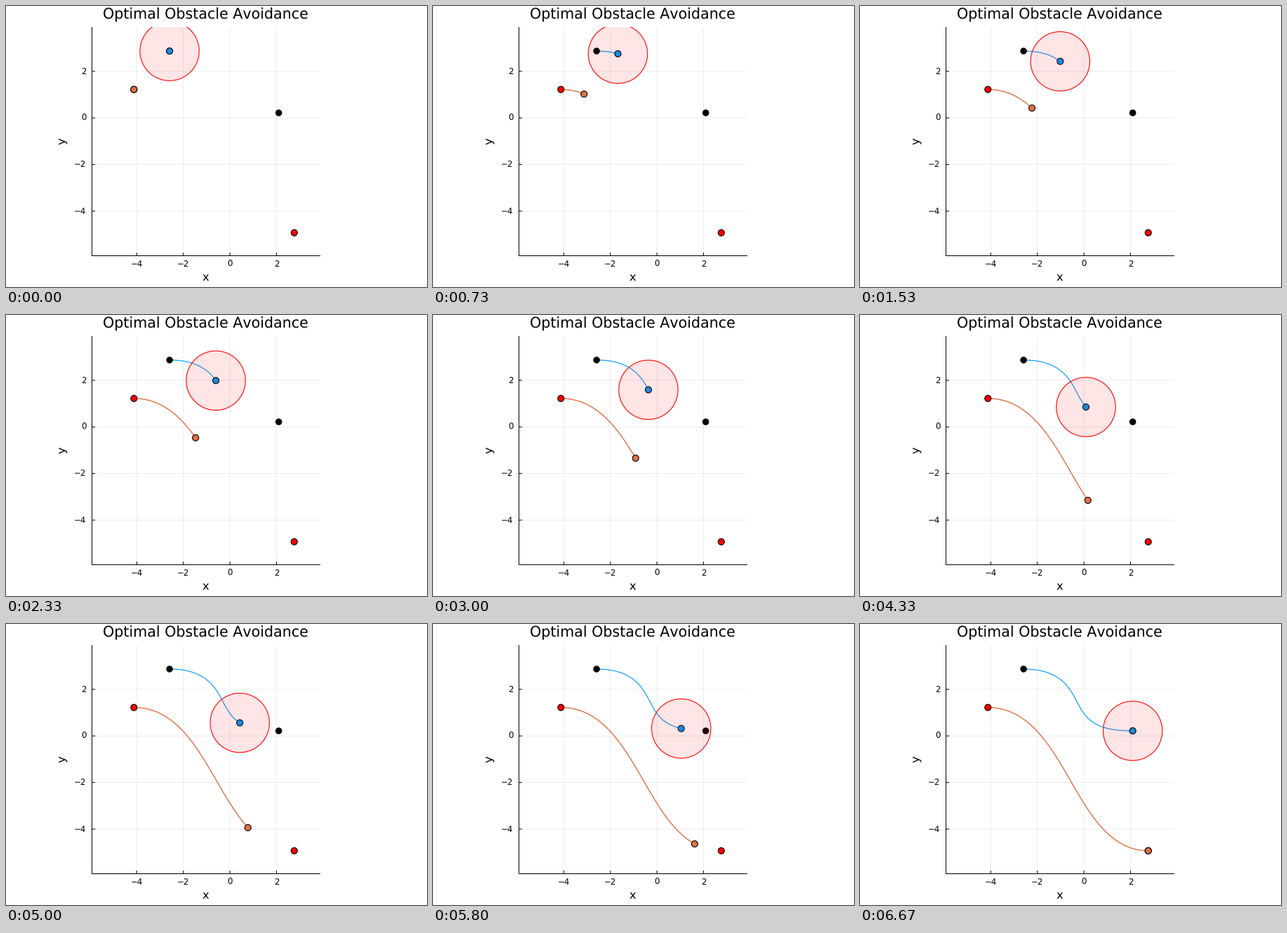
Animation, 600 px wide and 400 px high, one loop 6.74 s. Source, as a matplotlib script:

```python
import numpy as np
import matplotlib.pyplot as plt
from matplotlib.animation import FuncAnimation
from matplotlib.patches import Circle, Rectangle

plt.rcParams["text.kerning_factor"] = 6  # plain glyph advances, no pair kerning
plt.rcParams["text.hinting"] = "no_hinting"

W, H, DPI = 600, 400, 100
TICK, LOOP = 20, 6740
POSES, POSES_PER_MS = 101, 15 / 1000
PT = 72 / DPI  # points per pixel
LEFT, RIGHT, TOP, BOTTOM = 122.5, 447.5, 30.5, 355.5
UNIT, X0, Y0 = 33.17, 319.1, 159.3
BLUE, ORANGE = "#009af9", "#e26f46"


def glide(start, end, speed, push, skew):
    """Cubic with equal end speeds, bent aside midway by the avoidance push."""
    t = np.linspace(0, 1, POSES)
    cubic = start + (end - start) * t**2 * (3 - 2 * t)
    return cubic + speed * t * (1 - t) * (1 - 2 * t) \
        + t**2 * (1 - t)**2 * (push + skew * t)


blue_path = np.array([glide(233.1, 388.7, 331, -14, 14),
                      glide(64.1, 152.1, 0, 102, -48)])
orange_path = np.array([glide(182.3, 410.8, 326, 40, -45),
                        glide(118.8, 322.8, 0, -29, 0)])

fig = plt.figure(figsize=(W / DPI, H / DPI), dpi=DPI, facecolor="white")
ax = fig.add_axes([0, 0, 1, 1])
ax.set_xlim(0, W)
ax.set_ylim(H, 0)
ax.axis("off")


def line(xs, ys, color="black", width=1.0, **kw):
    return ax.plot(xs, ys, color=color, lw=width * PT, snap=False, **kw)[0]


def label(x, y, text, size, **kw):
    opts = dict(ha="center", va="baseline", family="DejaVu Sans", color="black")
    ax.text(x, y, text, fontsize=size * PT, **{**opts, **kw})


def dot(pos, color, z, radius=4.5):
    patch = Circle(pos, radius, fc=color, ec="black", lw=1.1 * PT, zorder=z)
    return ax.add_patch(patch)


for v in (-4, -2, 0, 2):
    x, y = X0 + UNIT * v, Y0 - UNIT * v
    text = str(v).replace("-", "\u2212")
    line([x, x], [TOP, BOTTOM], width=0.7, alpha=0.1, zorder=1)
    line([LEFT, RIGHT], [y, y], width=0.7, alpha=0.1, zorder=1)
    line([x, x], [BOTTOM, BOTTOM - 4], zorder=2)
    line([LEFT, LEFT + 4], [y, y], zorder=2)
    label(x, 371, text, 11.8)
    label(114.5, y + 3.8, text, 11.8, ha="right")
line([LEFT, LEFT], [TOP, BOTTOM], zorder=2)
line([LEFT, RIGHT], [BOTTOM, BOTTOM], zorder=2)

label(284.6, 18.2, "Optimal Obstacle Avoidance", 20.7)
label(284.4, 391.2, "x", 16.2)
label(88.6, 192.4, "y", 16.2, rotation=90, ha="right", va="center")

blue_trail = line([], [], BLUE, 1.15, zorder=3)
orange_trail = line([], [], ORANGE, 1.4, zorder=3)
for end in (0, -1):
    dot(blue_path[:, end], "black", 4, 4.2)
    dot(orange_path[:, end], "red", 4)
blue_dot = dot(blue_path[:, 0], BLUE, 5)
orange_dot = dot(orange_path[:, 0], ORANGE, 5)

zone = Circle(blue_path[:, 0], 42.2, fc=(1, 0, 0, 0.1), ec="red",
              lw=1.1 * PT, zorder=6)
ax.add_patch(zone)
zone.set_clip_path(Rectangle((LEFT, 30), RIGHT - LEFT, BOTTOM - 30,
                             transform=ax.transData))


def draw(k):
    # poses step at 15 per second; the small lead absorbs the tick size
    i = min(int((k * TICK + 15) * POSES_PER_MS), POSES - 1)
    blue_trail.set_data(*blue_path[:, :i + 1])
    orange_trail.set_data(*orange_path[:, :i + 1])
    blue_dot.center = zone.center = tuple(blue_path[:, i])
    orange_dot.center = tuple(orange_path[:, i])
    return blue_trail, orange_trail, blue_dot, orange_dot, zone


anim = FuncAnimation(fig, draw, frames=LOOP // TICK, interval=TICK,
                     init_func=lambda: draw(0), repeat=True, repeat_delay=0)
plt.show()
```
